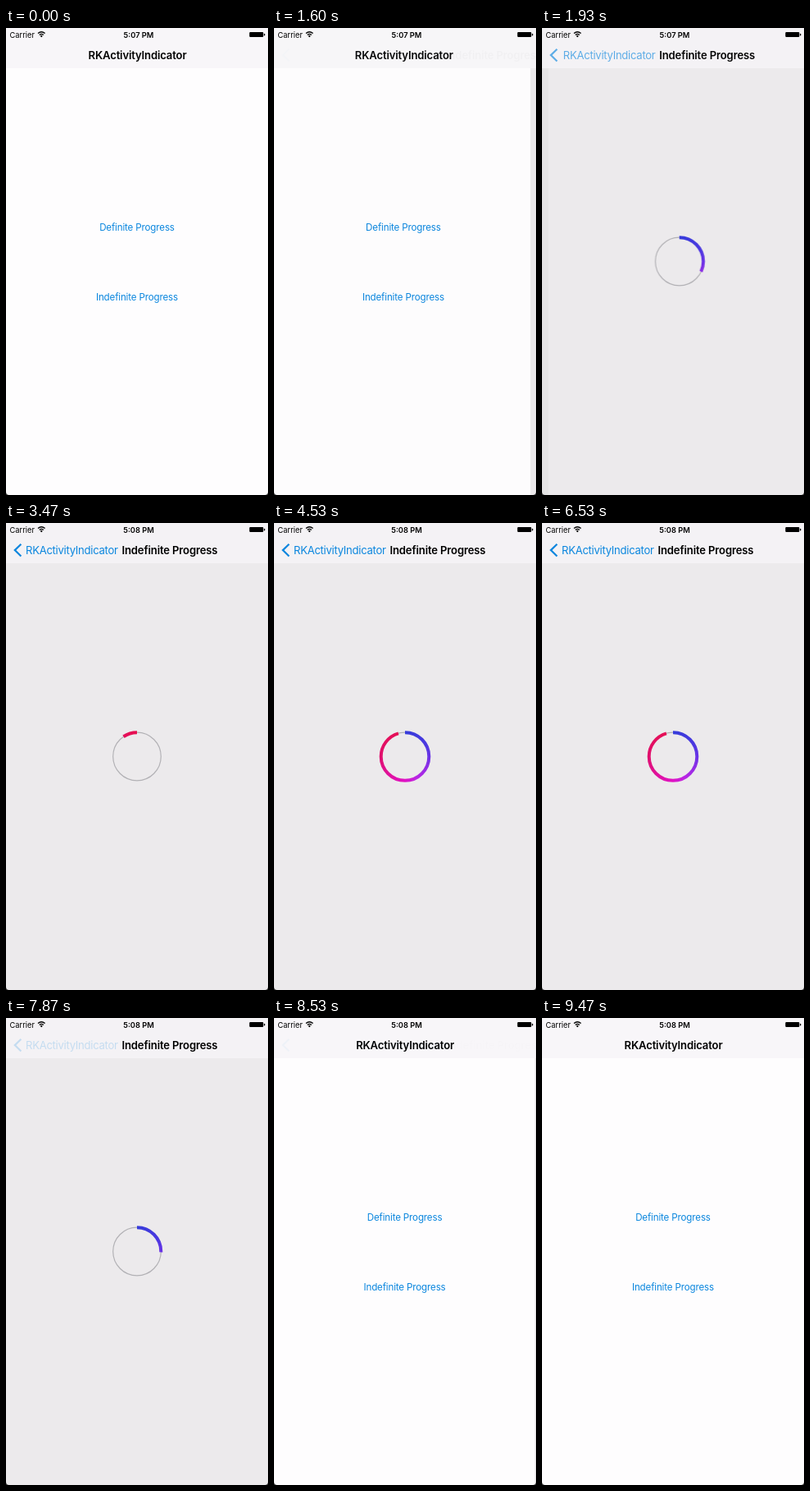
These frames come from a looping animation (320 px wide and 569 px high, 9.54 s). An HTML page with a canvas:

```html
<!DOCTYPE html>
<html lang="en">
<head>
<meta charset="utf-8">
<title>Activity indicator</title>
<style>
  html, body { margin: 0; width: 100%; height: 100%; overflow: hidden; }
  #stage { position: relative; width: 320px; height: 569px; overflow: hidden; background: #fefdfe; }
  #stage > * { position: absolute; left: 0; top: 0; }
  svg { display: block; font-family: Inter, "Liberation Sans", sans-serif; }
  .nav { font-size: 13.14px; letter-spacing: -.3px; }
  .bold { font-weight: 600; }
  .nav.bold { letter-spacing: -.16px; }
  .link { font-size: 11.6px; letter-spacing: -.16px; text-anchor: middle; }
  .status { font-size: 9.28px; }
  .blue { fill: #0a86de; }
  #shade { width: 320px; height: 569px; background: #000; }
  #page { width: 320px; height: 569px; background: #eceaec; }
  #ring { position: absolute; left: 125px; top: 249px; width: 70px; height: 70px; }
</style>
</head>
<body>
<div id="stage">
  <svg id="home" width="320" height="569">
    <text class="link blue" x="160" y="246.8">Definite Progress</text>
    <text class="link blue" x="160" y="331.6">Indefinite Progress</text>
  </svg>
  <div id="shade"></div>
  <div id="page"><canvas id="ring"></canvas></div>
  <svg width="320" height="569">
    <rect width="320" height="49" fill="#f6f5f8" fill-opacity=".78"/>

    <g class="status">
      <text x="4.6" y="11.5">Carrier</text>
      <text id="clock" class="bold" x="162" y="11.5" text-anchor="middle">5:07 PM</text>
    </g>
    <g fill="none" stroke="#000" stroke-width="1.3">
      <path d="M39 6.6Q43.3 2.8 47.6 6.6M40.8 8.5Q43.3 6.3 45.8 8.5"/>
      <circle cx="43.3" cy="10" r=".5"/>
    </g>
    <rect x="297.3" y="5" width="17" height="6" rx="1"/>
    <rect x="315" y="6.8" width="1.3" height="2.6" rx=".6"/>

    <text id="homeTitle" class="nav bold" x="100.5" y="37.7">RKActivityIndicator</text>
    <g id="back">
      <path d="M18.4 25.7L10.8 33.1L18.4 40.5" fill="none" stroke="#0a86de" stroke-width="2.2"/>
      <text id="backLabel" class="nav blue" x="24" y="37.7">RKActivityIndicator</text>
    </g>
    <text id="pageTitle" class="nav bold" x="141.5" y="37.7">Indefinite Progress</text>

    <path d="M0 565Q0 569 4 569H0ZM320 565Q320 569 316 569H320Z" fill="#333"/>
  </svg>
</div>
<script>
const LOOP = 9540, SLIDE = 525;
const PUSH = 1595, PRESS = 7530, POP = 8100, MINUTE = 3000, SPIN = 1590;
const STOPS = [
  [0, "#363cda"], [.17, "#4c38e0"], [.25, "#6a33e6"], [.31, "#8a2ee6"],
  [.42, "#ba26e4"], [.5, "#e012c4"], [.75, "#e0106e"], [1, "#e60f50"]
];

const $ = id => document.getElementById(id);
const clamp = x => Math.min(1, Math.max(0, x));
const bezier = (a, b, s) => 3 * (1 - s) ** 2 * s * a + 3 * (1 - s) * s * s * b + s ** 3;

// cubic-bezier(.36, .66, .04, 1), solved by bisection
function slideEase(x) {
  if (x <= 0 || x >= 1) return clamp(x);
  let lo = 0, hi = 1;
  for (let i = 0; i < 24; i++) {
    const mid = (lo + hi) / 2;
    if (bezier(.36, .04, mid) < x) lo = mid; else hi = mid;
  }
  return bezier(.66, 1, lo);
}

const dpr = window.devicePixelRatio || 1;
const CX = 35, CY = 35.5;
const ring = $("ring");
ring.width = ring.height = 70 * dpr;
const ctx = ring.getContext("2d");
ctx.scale(dpr, dpr);
const hues = ctx.createConicGradient(-Math.PI / 2, CX, CY);
STOPS.forEach(([at, color]) => hues.addColorStop(at, color));

function arc(from, to, width, style) {
  const angle = p => (p - .25) * 2 * Math.PI;
  ctx.beginPath();
  ctx.arc(CX, CY, 29.3, angle(from), angle(to));
  ctx.lineWidth = width;
  ctx.strokeStyle = style;
  ctx.stroke();
}

// The ring fills for a second, then is wiped from its start for a second.
function drawRing(t) {
  const turns = Math.max(0, t - SPIN) / 1000;
  const x = turns % 1;
  const p = .7 * x + .3 * x * x * (3 - 2 * x);
  ctx.clearRect(0, 0, 70, 70);
  arc(0, 1, 1.2, "#b2b1b5");
  if (Math.floor(turns) % 2) arc(p, 1, 4, hues);
  else arc(0, p, 4, hues);
}

function move(id, x) {
  $(id).style.transform = `translateX(${x}px)`;
}

function draw(t) {
  const leaving = t >= POP;
  const x = clamp((t - (leaving ? POP : PUSH)) / SLIDE);
  const e = slideEase(x);
  const shown = leaving ? 1 - e : e;
  const fade = leaving ? 1 - x : x;

  move("home", -96 * shown);
  move("page", 320 * (1 - shown));
  $("page").style.visibility = shown > 0 ? "visible" : "hidden";
  $("shade").style.opacity = .1 * shown;

  move("homeTitle", -76.5 * shown);
  $("homeTitle").style.opacity = clamp(1 - 1.6 * shown);
  move("backLabel", 76.5 * (1 - shown));
  $("back").style.opacity = fade * (t >= PRESS ? .2 : 1);
  move("pageTitle", 70 * (1 - shown));
  $("pageTitle").style.opacity = shown;

  $("clock").textContent = t < MINUTE ? "5:07 PM" : "5:08 PM";
  drawRing(t);
}

const start = performance.now();
function tick() {
  draw((performance.now() - start) % LOOP);
  requestAnimationFrame(tick);
}
tick();
</script>
</body>
</html>
```
